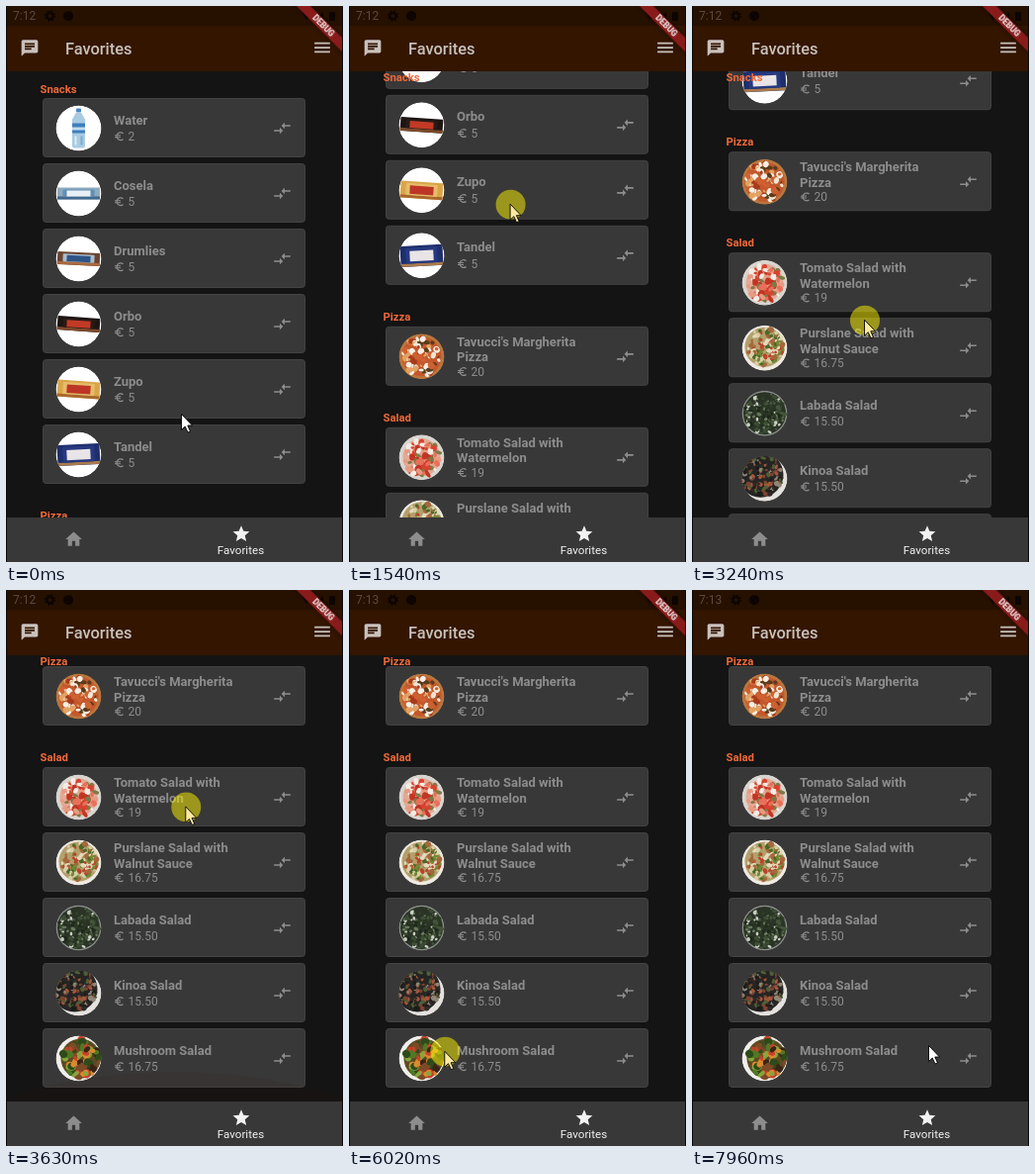
Recreate the animation shown at these times as an HTML page. Size 341 by 562 pixels, loop 8 s.

```html
<!DOCTYPE html>
<html lang="en">
<head>
<meta charset="utf-8">
<title>Favorites</title>
<style>
  html, body { margin: 0; height: 100%; overflow: hidden; background: #141414; }
  svg { display: block; }
  text { font-family: Roboto, "Noto Sans", sans-serif; }
  .name { font-weight: 700; font-size: 13px; fill: #8d8d8d; }
  .price { font-size: 12px; fill: #8d8d8d; }
  .head { font-weight: 700; font-size: 11.3px; fill: #f0693a; }
  .ribbon { filter: drop-shadow(0 0 2.5px rgba(0, 0, 0, .5)); }
</style>
</head>
<body>
<svg id="stage" width="341" height="562" viewBox="0 0 341 562"></svg>
<script>
const LOOP = 8000;

const ICONS = {
  chat: 'M20 2H4c-1.1 0-2 .9-2 2v18l4-4h14c1.1 0 2-.9 2-2V4c0-1.1-.9-2-2-2zM6 9h12v2H6zm8 5H6v-2h8zm4-6H6V6h12z',
  menu: 'M3 18h18v-2H3zm0-5h18v-2H3zm0-7v2h18V6z',
  swap: 'M9 14H2v2h7v3l4-4-4-4zm6-1v-3h7V8h-7V5l-4 4z',
  home: 'M10 20v-6h4v6h5v-8h3L12 3 2 12h3v8z',
  star: 'M12 17.3L18.2 21l-1.7-7L22 9.2l-7.2-.6L12 2 9.2 8.6 2 9.2 7.5 14l-1.7 7z',
  euro: 'M15 18.5c-2.5 0-4.7-1.4-5.8-3.5H15v-2H8.6a7 7 0 0 1 0-2H15V9H9.2a6.5 6.5 0 0 1 10-1.9L21 5.3A9 9 0 0 0 6.5 9H3v2h3v2H3v2h3.5A9 9 0 0 0 21 18.7l-1.8-1.8a6.4 6.4 0 0 1-4.2 1.6z'
};

const icon = (name, x, y, size, fill) =>
  `<path d="${ICONS[name]}" fill="${fill}" transform="translate(${x} ${y}) scale(${size / 24}) translate(-12 -12)"/>`;
const text = (str, x, y, attrs) => `<text x="${x}" y="${y}" ${attrs}>${str}</text>`;
const rect = (x, y, w, h, fill, r = 0) =>
  `<rect x="${x}" y="${y}" width="${w}" height="${h}" rx="${r}" fill="${fill}"/>`;
const disc = (x, y, r, fill) => `<circle cx="${x}" cy="${y}" r="${r}" fill="${fill}"/>`;

function random(seed) {
  return () => (seed = (seed * 16807) % 2147483647) / 2147483647;
}

// Thumbnails are drawn around 0,0 and clipped to a disc of radius 23.
const bottle = () => disc(0, 0, 23, '#fff') +
  rect(-2.5, -20, 5, 4, '#4b86c4', 1) +
  '<path d="M-2.5-16h5l4 7v27q0 2-2 2h-9q-2 0-2-2V-9z" fill="#a9cbe2"/>' +
  rect(-6.5, -5, 13, 10, '#3f7fbd') + rect(-6.5, -1, 13, 3, '#c3dcee') +
  rect(-4, 8, 2, 9, '#dcecf5') + rect(2, 8, 2, 9, '#7aaccd');

const bar = (h, tilt, wrap, panel, mark, trim) => disc(0, 0, 23, '#fff') +
  `<g transform="rotate(${tilt})">` + rect(-21.5, -h / 2, 43, h, wrap, 1) +
  rect(-21.5, h / 2 - 3, 43, 3, trim) + rect(-16, -h / 2 + 2, 32, h - 5, panel, 1) +
  rect(-12, -h / 4, 24, h / 2, mark) + '</g>';

// Bits of food, up to `size` wide, scattered over a heap that lies on a plate.
function food(seed, plate, heap, [x, y, r], size, count, colors) {
  const rnd = random(seed * 7919);
  let out = disc(0, 0, 23, plate) + disc(x, y, r, heap);
  for (let i = 0; i < count; i++) {
    const a = rnd() * Math.PI * 2, d = Math.sqrt(rnd()) * (r - 1);
    const rx = size * (.4 + rnd() * .6), ry = rx * (.45 + rnd() * .5);
    out += `<ellipse rx="${rx}" ry="${ry}" fill="${colors[i % colors.length]}" transform="translate(${
      x + Math.cos(a) * d} ${y + Math.sin(a) * d}) rotate(${rnd() * 180})"/>`;
  }
  return out;
}

const ITEMS = [
  [93, 'Water', '2', bottle()],
  [159, 'Cosela', '5', bar(12, 0, '#8fa9bd', '#5f8fb5', '#e8eff4', '#41698c')],
  [225, 'Drumlies', '5', bar(13, 3, '#6b4330', '#a9bccd', '#2f5488', '#a8693f')],
  [291, 'Orbo', '5', bar(14, 4, '#1d1513', '#2a1a16', '#c23a26', '#7d4a2c')],
  [357, 'Zupo', '5', bar(17, 4, '#d9a54a', '#e6bd69', '#bd3527', '#a9672d')],
  [423, 'Tandel', '5', bar(21, -3, '#1f2f6d', '#26397f', '#e9e4e6', '#a87a4c')],
  [525, "Tavucci's Margherita|Pizza", '20',
    food(9, '#b9763d', '#c4572c', [0, 0, 20], 4, 75, ['#f1e6d3', '#cf6030', '#f6efe2', '#a63a1c', '#e2a263', '#5a3c1c'])],
  [627, 'Tomato Salad with|Watermelon', '19',
    food(12, '#d8d4cf', '#e3aa95', [0, 0, 19], 4.2, 95, ['#d8432f', '#e8705a', '#f3ece4', '#c23524', '#e99a82', '#7d7a45'])],
  [693, 'Purslane Salad with|Walnut Sauce', '16.75',
    food(35, '#eeeae2', '#b3a06c', [0, -1, 20], 3.4, 120, ['#6f8a34', '#b9432b', '#e3dabc', '#4b6826', '#a4683c', '#d8cfa8'])],
  [759, 'Labada Salad', '15.50',
    food(58, '#8a8f8a', '#2a3326', [0, 0, 21.5], 2.6, 150, ['#43553a', '#1d281a', '#66775a', '#2c3b22', '#c9cfc0', '#3b4c33'])],
  [825, 'Kinoa Salad', '15.50',
    food(64, '#e4e1de', '#262524', [-4, -4, 23], 3, 130, ['#7d4330', '#2d2a27', '#a3563a', '#4f5f35', '#1d1b19', '#8f8577'])],
  [891, 'Mushroom Salad', '16.75',
    food(83, '#f0eeea', '#5b4a22', [2, 0, 20], 5.5, 70, ['#4f7a24', '#3a2418', '#c8412a', '#d98a2f', '#2f4a1a', '#7c4a26', '#86a63c'])]
];

function card([y, name, price, thumb]) {
  const lines = name.split('|');
  const [top, priceY] = lines.length > 1 ? [20, 50] : [26.5, 43];
  return `<g transform="translate(0 ${y})">
    <rect x="37.5" y=".5" width="265" height="59" rx="3" fill="#383838" stroke="#434343"/>
    <g transform="translate(73.5 30.5)" clip-path="url(#round)">${thumb}</g>` +
    lines.map((line, i) => text(line, 109, top + i * 15.5, 'class="name"')).join('') +
    icon('euro', 114.5, priceY - 4.3, 12, '#8d8d8d') +
    text(price, 123.5, priceY, 'class="price"') +
    icon('swap', 279.5, 30.5, 20, '#8d8d8d') + '</g>';
}

// Section titles with their natural centre line.
const HEADS = [['Snacks', 84], ['Pizza', 515], ['Salad', 617]];
const STICK = 72;

document.getElementById('stage').innerHTML = `
  <defs>
    <clipPath id="view"><rect y="66" width="341" height="451"/></clipPath>
    <clipPath id="round"><circle r="23"/></clipPath>
  </defs>
  ${rect(0, 0, 341, 562, '#141414')}
  <g clip-path="url(#view)">
    <g id="list">${ITEMS.map(card).join('')}</g>
    ${HEADS.map(([name]) => text(name, 34.5, 4, 'class="head"')).join('')}
    <ellipse id="glow" cx="170" cy="637" rx="300" ry="150" fill="#331400"/>
  </g>
  ${rect(0, 0, 341, 66, '#331500')}${rect(0, 0, 341, 20, '#261000')}
  <text id="clock" x="7" y="14.3" font-size="12" fill="#5c4a3f"></text>
  <circle cx="44.5" cy="10" r="3.2" fill="none" stroke="#0c0502" stroke-width="2.2"/>
  <circle cx="44.5" cy="10" r="4.8" fill="none" stroke="#0c0502" stroke-width="1.6" stroke-dasharray="1.9"/>
  ${disc(63, 10, 5, '#0c0502')}
  <path d="M299 6h11l-5.5 8zM313 14l8-8v8zM327 6h6v9h-6z" fill="#0c0502"/>
  ${icon('chat', 24, 42.5, 20, '#c9c1bc')}
  ${text('Favorites', 60, 49, 'font-size="16.4" font-weight="500" fill="#c9c1bc"')}
  ${icon('menu', 320, 42, 21, '#c9c1bc')}
  <g class="ribbon" transform="translate(341 0) rotate(45)">
    ${rect(-40, 23.3, 80, 10, '#8a1b1b')}
    ${text('DEBUG', 0, 31.3, 'font-size="8.5" font-weight="900" fill="#e8dada" text-anchor="middle"')}
  </g>
  ${rect(0, 517, 341, 45, '#383838')}
  ${icon('home', 68.5, 539, 20, '#8d8d8d')}
  ${icon('star', 238, 533.5, 20, '#f2f2f2')}
  ${text('Favorites', 237.5, 554, 'font-size="11.6" fill="#f2f2f2" text-anchor="middle"')}
  ${rect(0, 0, 1, 562, '#080808')}${rect(340, 0, 1, 562, '#080808')}
  <g id="pointer">
    <circle id="touch" r="15" fill="#fff500" fill-opacity=".5"/>
    <path id="arrow" d="M-.5-.5V15.5L3.2 12 6 18 8.5 17 5.8 11H10.5z" stroke="#000" stroke-width=".9"/>
  </g>`;

const $ = id => document.getElementById(id);
const heads = document.querySelectorAll('.head');

// Keys are [time, value, ...]; values run linearly between them.
const POINTER = [
  [0, 178, 413], [79, 178, 413], [80, 175, 417], [410, 175, 417], [930, 179, 325],
  [2080, 150, 91], [2160, 149, 88], [2240, 149, 88], [2770, 178, 401], [2900, 178, 401],
  [3240, 175, 318], [3500, 179, 247], [3780, 186, 188], [4240, 190, 170], [4410, 191, 171],
  [4480, 191, 171], [5250, 138, 437], [5560, 97, 467], [6020, 97, 467], [6370, 200, 361],
  [6710, 291, 445], [7110, 291, 445], [7880, 220, 457], [7959, 220, 457], [7960, 240, 461]
];
const SCROLL = [
  [0, 0], [500, 0], [930, 75.5], [2080, 312], [2160, 316], [2240, 318],
  [2960, 318], [3240, 377.5], [3500, 448]
];
const GLOW = [
  [3500, 0], [3800, .2], [4410, .16], [5000, 0], [6150, 0], [6370, .12], [7110, .1], [7500, 0]
];
const PRESSES = [[230, 2240], [2770, 4410], [6020, 7110]];

function at(keys, t) {
  const i = keys.findIndex(key => key[0] > t);
  if (i < 0) return keys[keys.length - 1].slice(1);
  if (i === 0) return keys[0].slice(1);
  const a = keys[i - 1], b = keys[i], f = (t - a[0]) / (b[0] - a[0]);
  return a.slice(1).map((v, n) => v + (b[n + 1] - v) * f);
}

const move = (el, x, y) => el.setAttribute('transform', `translate(${x} ${y})`);

function draw(t) {
  const [scroll] = at(SCROLL, t), [x, y] = at(POINTER, t);
  const pressed = PRESSES.some(([from, to]) => t >= from && t < to);
  move($('list'), 0, -scroll);
  heads.forEach((el, i) => {
    const next = HEADS[i + 1] ? HEADS[i + 1][1] - scroll - 16 : Infinity;
    move(el, 0, Math.min(Math.max(HEADS[i][1] - scroll, STICK), next));
  });
  move($('pointer'), x, y);
  $('touch').setAttribute('opacity', pressed ? 1 : 0);
  $('arrow').setAttribute('fill', pressed ? '#ffe9a0' : '#fff');
  $('glow').setAttribute('opacity', at(GLOW, t)[0]);
  $('clock').textContent = t < 4000 ? '7:12' : '7:13';
}

const start = performance.now();
function tick() {
  draw((performance.now() - start) % LOOP);
  requestAnimationFrame(tick);
}
tick();
</script>
</body>
</html>
```
